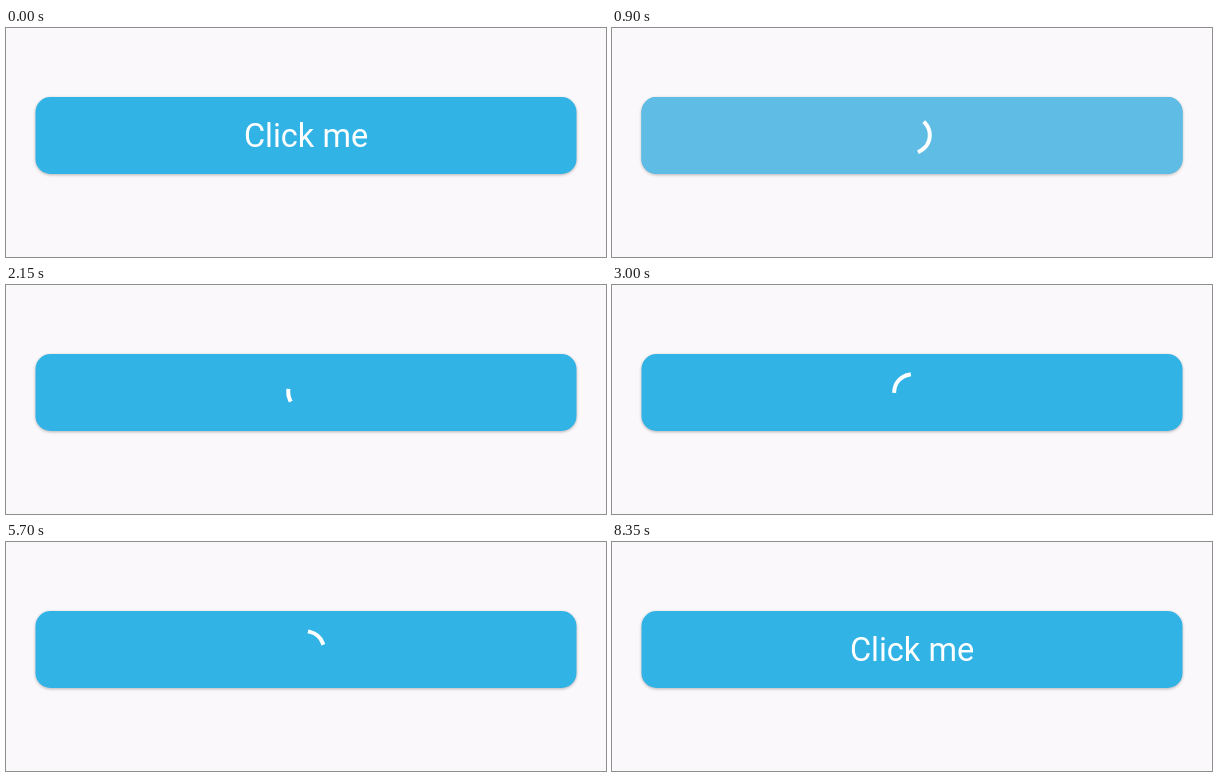
Animation of 600x229 px, one loop 8450 ms. Source, as an HTML page:

```html
<!DOCTYPE html>
<html lang="en">
<head>
<meta charset="utf-8">
<title>Loading button</title>
<style>
  html, body { margin: 0; width: 100%; height: 100%; overflow: hidden; background: #faf8fb; }
  svg { display: block; }
  #button { filter: drop-shadow(0 1.5px 1.5px rgba(0, 0, 0, .28)); }
  text { font: 32.5px Roboto, sans-serif; fill: #fff; text-anchor: middle; }
  #spinner { fill: none; stroke: #fff; stroke-width: 4; stroke-linecap: square; }
</style>
</head>
<body>
<svg width="600" height="229" viewBox="0 0 600 229">
  <clipPath id="shape"><rect x="29.5" y="69" width="541" height="77" rx="15"/></clipPath>
  <rect id="button" x="29.5" y="69" width="541" height="77" rx="15" fill="#32b3e6"/>
  <g clip-path="url(#shape)"><circle id="ripple" cx="300" cy="107.5" fill="#5fbce4"/></g>
  <text id="label" x="300" y="118.5">Click me</text>
  <circle id="spinner" cx="300" cy="107.2" r="17.8" pathLength="360"/>
</svg>
<script>
const LOOP = 8450, PRESS = 200, RELEASE = 693, DONE = 5725;
const CYCLE = 1333, TURN = 4444;
const [ripple, label, spinner] = ['ripple', 'label', 'spinner'].map(id => document.getElementById(id));

const clamp = v => Math.min(1, Math.max(0, v));
const cubic = (a, b, c, d, u) => {
  const v = 1 - u;
  return v * v * v * a + 3 * v * v * u * b + 3 * v * u * u * c + u * u * u * d;
};

// Height of a 0-to-1 Bezier easing whose x control values are given
function ease(x, ...xs) {
  if (x <= xs[0]) return 0;
  if (x >= xs[3]) return 1;
  let low = 0, high = 1;
  for (let i = 0; i < 24; i++) {
    const mid = (low + high) / 2;
    if (cubic(...xs, mid) < x) low = mid; else high = mid;
  }
  return cubic(0, 0, 1, 1, low);
}

function drawRipple(t) {
  const grow = 1 - (1 - clamp((t - PRESS) / 300)) ** 2;
  ripple.setAttribute('r', 280 * grow);
  ripple.setAttribute('opacity', clamp((t - PRESS) / 75) * clamp((1150 - t) / 250));
}

function drawSpinner(time) {
  const p = time % CYCLE / CYCLE;
  const tail = 270 * ease(p, .5, .7, .6, 1);
  const head = 270 * ease(p, 0, .2, .1, .5);
  const turn = 720 * time / TURN + 360 * Math.floor(time / CYCLE) + 90 * p;
  spinner.setAttribute('stroke-dasharray', `${Math.max(.01, head - tail)} 720`);
  spinner.setAttribute('transform', `rotate(${turn + tail - 90} 300 107.2)`);
}

function draw(now) {
  const t = now % LOOP;
  const loading = t >= RELEASE && t < DONE;
  label.style.display = loading ? 'none' : '';
  spinner.style.display = loading ? '' : 'none';
  drawRipple(t);
  if (loading) drawSpinner(t - RELEASE);
}

let start;
function tick(now) {
  start ??= now;
  draw(now - start);
  requestAnimationFrame(tick);
}
draw(0);
requestAnimationFrame(tick);
</script>
</body>
</html>
```
